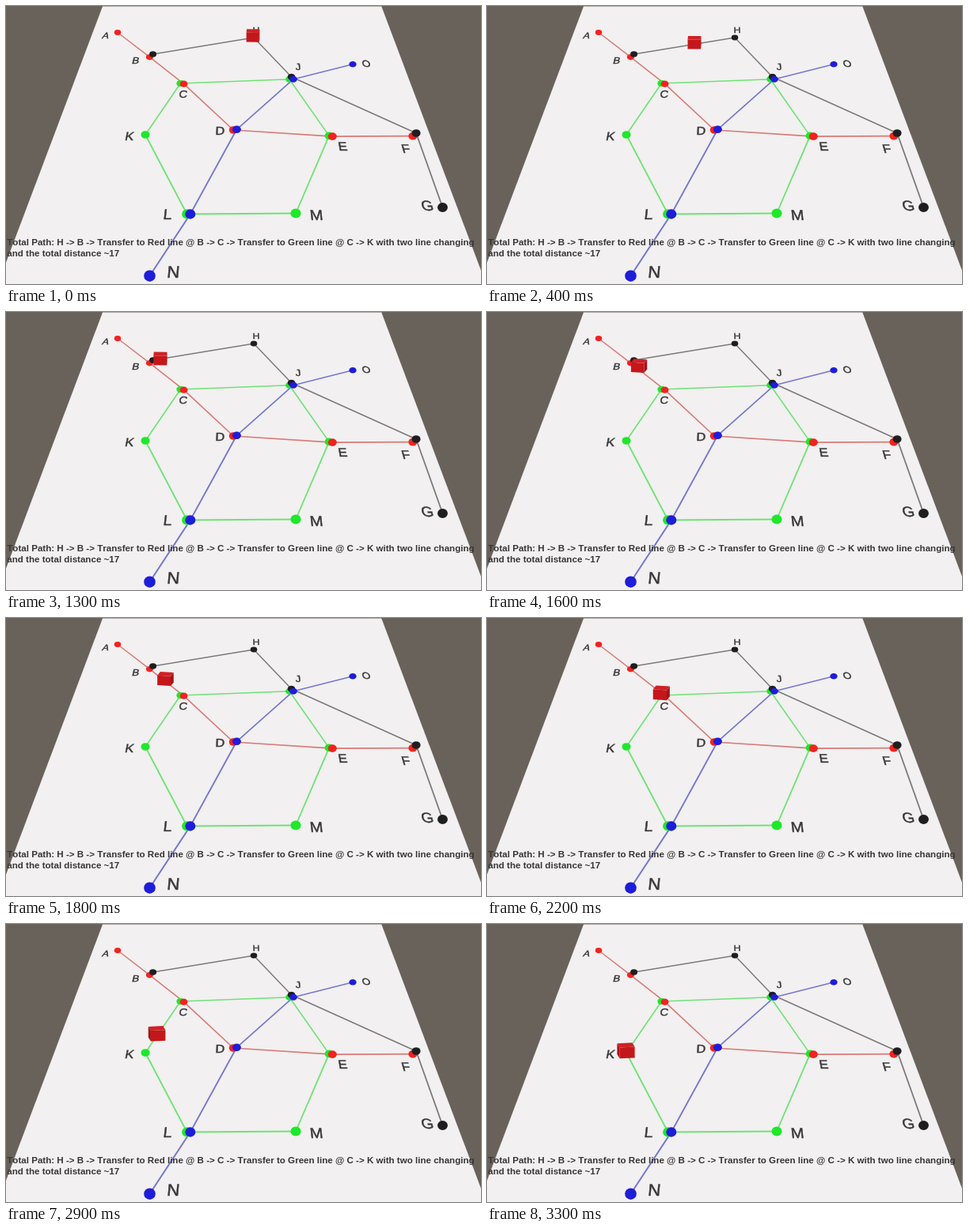
Recreate the animation shown at these times as an HTML page with a canvas. Size 600x352 px, loop 3400 ms.

```html
<!DOCTYPE html>
<html>
<head>
<meta charset="utf-8">
<style>
html, body { margin: 0; width: 100%; height: 100%; overflow: hidden; background: #68625b; }
canvas { display: block; }
</style>
</head>
<body>
<canvas id="stage" width="600" height="352"></canvas>
<script>
const ctx = document.getElementById('stage').getContext('2d');
const LOOP = 3400, STEP = 100;
const FONT = '"Liberation Sans", Arial, sans-serif';
const HORIZON = { x: 298, y: -469 };

// Station: x, y, label offset x, y
const stations = {
  A: [141, 33.5, -15, 4], B: [183.5, 64, -19.5, 5], C: [222.5, 98, 1.5, 13],
  D: [289.3, 156.3, -19, 1], E: [410.2, 164.4, 15, 13], F: [516, 164, -11, 16],
  G: [551.5, 255, -19.5, -2], H: [313, 40, 3, -10], J: [360.5, 92.7, 8.5, -16],
  K: [176, 163, -20, 2], L: [230.7, 263.5, -26.5, 0], M: [366, 262.5, 26, 2],
  N: [181.5, 341.7, 30, -5], O: [438, 73.7, 17, -1]
};

// Metro lines, left to right where they share a station
const lines = [
  { stops: 'CJEMLKC', dot: '#1ee82a', rail: '#6ee276', lift: 0 },
  { stops: 'ABCDEF', dot: '#f3211f', rail: '#d87a77', lift: -0.7 },
  { stops: 'BHJFG', dot: '#1e1e20', rail: '#7c7a7b', lift: 3 },
  { stops: 'OJDLN', dot: '#1d1dda', rail: '#7476d0', lift: 0 }
];

// Cube corners of the trip H, B, C, K: time, x, y
const trip = [
  [0, 312, 37.5], [400, 262, 46.3], [1440, 184.5, 61],
  [2215, 221, 95.5], [3240, 175.5, 160.3]
];

function shape(pts, color) {
  ctx.beginPath();
  pts.forEach(([x, y]) => ctx.lineTo(x, y));
  ctx.closePath();
  ctx.fillStyle = color;
  ctx.fill();
}

function along(keys, t) {
  let i = 1;
  while (i < keys.length - 1 && t > keys[i][0]) i++;
  const a = keys[i - 1], b = keys[i];
  const k = Math.min(1, (t - a[0]) / (b[0] - a[0]));
  return [a[1] + (b[1] - a[1]) * k, a[2] + (b[2] - a[2]) * k];
}

// Lines that share a station sit side by side
function stopAt(line, name) {
  const [x, y] = stations[name];
  const shared = lines.filter(l => l.stops.includes(name));
  if (shared.length === 1) return [x, y];
  const slot = shared.indexOf(line) - (shared.length - 1) / 2;
  return [x + slot * (shared.length === 2 ? 4.2 : 2.5), y - line.lift];
}

function drawBoard() {
  ctx.fillStyle = '#68625b';
  ctx.fillRect(0, 0, 600, 352);
  shape([[122, 0.6], [474.3, 0.6], [610.3, 362], [-14, 362]], '#f2f0f0');
}

function drawRails(line) {
  const pts = [...line.stops].map(name => stopAt(line, name));
  ctx.strokeStyle = line.rail;
  ctx.lineCap = 'round';
  for (let i = 1; i < pts.length; i++) {
    const [x1, y1] = pts[i - 1], [x2, y2] = pts[i];
    ctx.lineWidth = 1.35 + (y1 + y2) / 900;
    ctx.beginPath();
    ctx.moveTo(x1, y1);
    ctx.lineTo(x2, y2);
    ctx.stroke();
  }
}

function drawDots(line) {
  ctx.fillStyle = line.dot;
  for (const name of line.stops) {
    const [x, y] = stopAt(line, name);
    const r = 3.9 + y * 0.01;
    ctx.beginPath();
    ctx.ellipse(x, y, r, r * (0.78 + y * 0.0006), 0, 0, 7);
    ctx.fill();
  }
}

function drawLabels() {
  ctx.fillStyle = ctx.strokeStyle = '#3a393a';
  ctx.textAlign = 'center';
  ctx.lineWidth = 0.5;
  for (const [name, [sx, sy, dx, dy]] of Object.entries(stations)) {
    const x = sx + dx, y = sy + dy, size = 11.2 + y * 0.033;
    ctx.save();
    // Lean toward the vanishing point of the board
    const lean = 0.8 * (x - HORIZON.x) / (y - HORIZON.y);
    ctx.transform(1, 0, lean, 0.84 + y * 0.0003, x, y);
    ctx.font = `${size}px ${FONT}`;
    ctx.fillText(name, 0, size * 0.36);
    ctx.strokeText(name, 0, size * 0.36);
    ctx.restore();
  }
}

function drawCube(t) {
  const [x, y] = along(trip, t);
  const yaw = t < 1440 ? 0.03 : t < 2215 ? 0.22 : -0.17;
  const size = 15.4 + y * 0.024;
  const rise = size * 0.36;
  const corners = [1, 3, 5, 7].map(n => {
    const a = yaw + n * Math.PI / 4, r = size * Math.SQRT1_2;
    return [x + r * Math.cos(a), y + r * Math.sin(a) * 0.28];
  });
  const top = corners.map(([u, v]) => [u, v - rise]);
  const base = corners.map(([u, v]) => [u, v + rise]);
  for (let i = 0; i < 4; i++) {
    const j = (i + 1) % 4;
    if (corners[i][0] <= corners[j][0]) continue;
    const front = i === 0;
    shape([top[i], top[j], base[j], base[i]], front ? '#c4171b' : '#a51316');
  }
  shape(top, '#ce2225');
}

function drawCaption() {
  ctx.fillStyle = '#373536';
  ctx.textAlign = 'left';
  ctx.fontKerning = 'none';
  ctx.font = `bold 11.58px ${FONT}`;
  ctx.fillText('Total Path: H -> B -> Transfer to Red line @ B -> C -> Transfer to Green line @ C -> K with two line changing', 1.3, 303);
  ctx.fillText('and the total distance ~17', 1.3, 316.5);
}

function drawPointer(t) {
  if (t < 2600 || t >= 2800) return;
  const [x, y] = along([[2600, 526, 26.5], [2800, 556, -14]], t);
  const arrow = [[0, 0], [0, 11], [2.5, 8.7], [4.3, 12.6], [6, 11.8], [4.3, 8], [7.6, 7.7]];
  shape(arrow.map(([u, v]) => [x + u, y + v]), '#fff');
  ctx.strokeStyle = '#222';
  ctx.lineWidth = 0.8;
  ctx.stroke();
}

function draw(now) {
  const t = Math.floor((now % LOOP) / STEP) * STEP;
  drawBoard();
  lines.forEach(drawRails);
  lines.forEach(drawDots);
  drawLabels();
  drawCube(t);
  drawCaption();
  drawPointer(t);
}

let start;
function tick(now) {
  start ??= now;
  draw(Math.max(0, now - start));
  requestAnimationFrame(tick);
}
draw(0);
requestAnimationFrame(tick);
</script>
</body>
</html>
```
